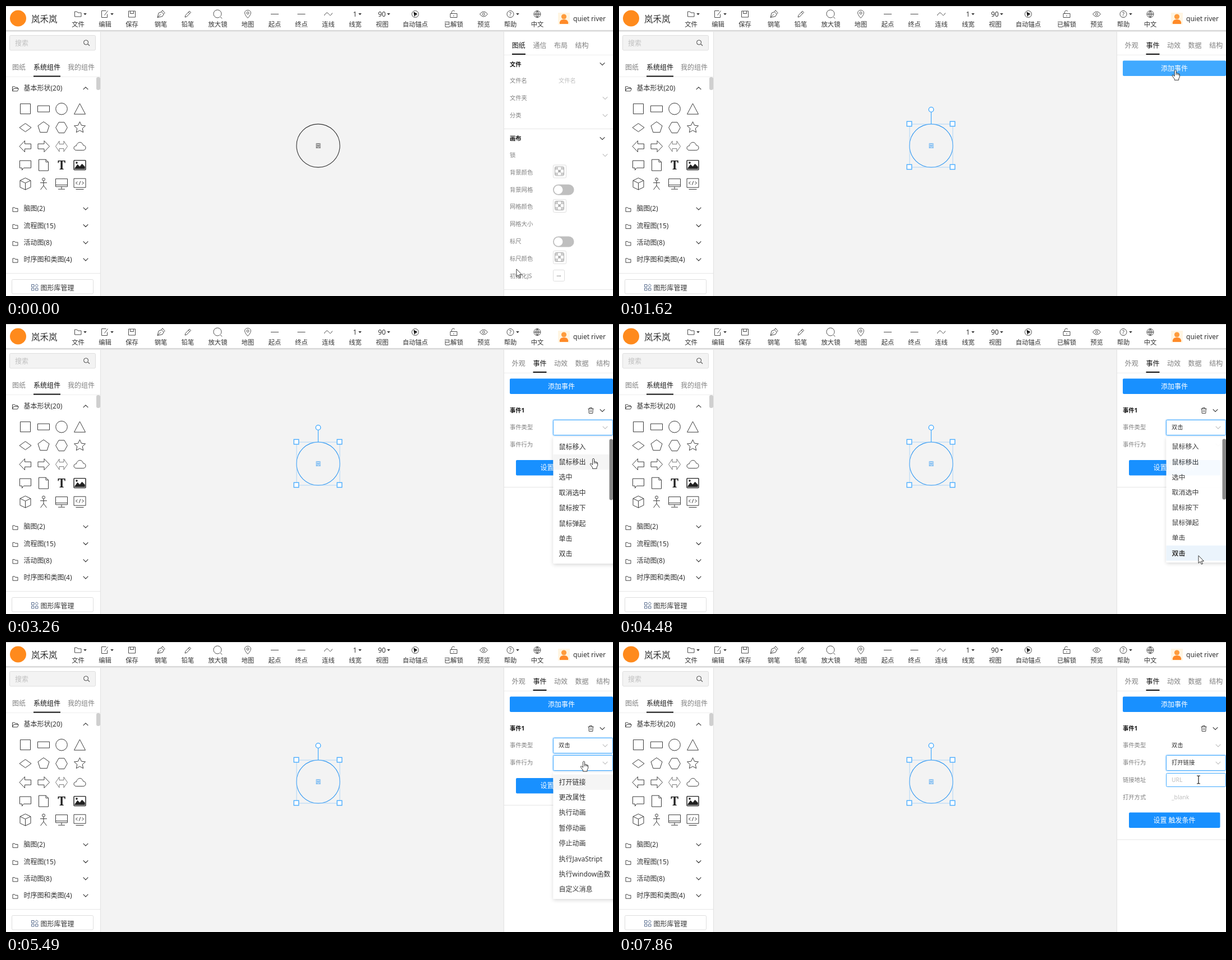
These frames come from a looping animation (1082x518 px, 8 s). An HTML page:

```html
<!DOCTYPE html>
<html lang="zh-CN">
<head>
<meta charset="utf-8">
<title>Diagram editor</title>
<style>
html, body { margin: 0; width: 100%; height: 100%; overflow: hidden; background: #fff; }
svg { display: block; width: 100vw; height: 100vh; }
text { font-family: "Noto Sans", "Noto Sans CJK SC", "Noto Sans CJK", sans-serif; white-space: pre; }
</style>
</head>
<body>
<svg id="stage" viewBox="0 0 1082 518"></svg>
<script>
const DARK = '#333', GREY = '#808080', PALE = '#bfbfbf', BLUE = '#1890ff', LIGHT = '#40a9ff';

// ---- drawing helpers (text y is the visual centre of the line) ----
const text = (s, x, y, size = 12, fill = DARK, anchor = 'start', more = '') =>
  `<text x="${x}" y="${y + size * 0.37}" font-size="${size}" fill="${fill}" text-anchor="${anchor}" ${more}>${s}</text>`;
const mid = (s, x, y, size, fill, more) => text(s, x, y, size, fill, 'middle', more);
const bold = (s, x, y) => text(s, x, y, 10.3, '#111', 'start', 'font-weight="700"');
const label = (s, y) => text(s, 898, y, 10.3, GREY);
const rect = (x, y, w, h, fill, stroke = 'none', r = 0, more = '') =>
  `<rect x="${x}" y="${y}" width="${w}" height="${h}" rx="${r}" fill="${fill}" stroke="${stroke}" ${more}/>`;
const circle = (x, y, r, fill = 'none', stroke = 'none', w = 1) =>
  `<circle cx="${x}" cy="${y}" r="${r}" fill="${fill}" stroke="${stroke}" stroke-width="${w}"/>`;
const icon = (x, y, d, color = '#444', w = 1, fill = 'none') =>
  `<path transform="translate(${x} ${y})" d="${d}" fill="${fill}" stroke="${color}" stroke-width="${w}" stroke-linejoin="round"/>`;
const hline = (x1, x2, y, color = '#e6e6e6') => icon(0, 0, `M${x1} ${y}H${x2}`, color);
const chevron = (x, y, color = DARK, flip = 1) =>
  icon(x, y, `M-4.3 ${-2.2 * flip}L0 ${2.2 * flip}L4.3 ${-2.2 * flip}`, color, 1.1);
const caret = (x, y) => icon(x, y, 'M-2.8-1.5H2.8L0 1.8Z', 'none', 0, DARK);
const group = (id, body) => `<g id="${id}">${body}</g>`;

const ring = r => `M${-r} 0a${r} ${r} 0 1 1 ${2 * r} 0a${r} ${r} 0 1 1 ${-2 * r} 0Z`;
const polygon = (n, r, inner = r, turn = -90) => 'M' + Array.from({ length: n }, (_, i) => {
  const a = (turn + i * 360 / n) * Math.PI / 180, k = i % 2 ? inner : r;
  return (k * Math.cos(a)).toFixed(2) + ' ' + (k * Math.sin(a)).toFixed(2);
}).join('L') + 'Z';
const FOLDER = 'M-6-4.5H-2L-.5-2.5H5.5V4.5H-6Z';

// ---- header ----
function header() {
  const tools = [
    ['文件', 128.5, FOLDER, 141], ['编辑', 176.5, 'M2-6H-6V6H4V0M5-6L-1 2', 189],
    ['保存', 224.5, 'M-6-5.5H6V5.5H-6ZM-3-5.5V-1H3V-5.5'],
    ['钢笔', 276, 'M-6 6L-4-2L1-4L5 0L3 4ZM1-4L3-7L7-2L5 0M-6 6L0 0'],
    ['铅笔', 324, 'M-5 5.5L-4 2L3-5.5L5.5-3L-2 4.5ZM1-3.5L3.5-1'],
    ['放大镜', 377.5, 'M3.5 5.2A7 7 0 1 1 5.2 3.5M4 4L7.5 8'],
    ['地图', 431, 'M0 7C-9-2-5-7 0-7S9-2 0 7ZM-2-2A2 2 0 1 0 2-2A2 2 0 1 0-2-2'],
    ['起点', 479, 'M-7 0H7'], ['终点', 526.5, 'M-7 0H7'],
    ['连线', 574.5, 'M-7 2.5C-4-4-1-3 1 0S5 3 7-2'],
    ['线宽', 622.5, '', 631], ['视图', 670.5, '', 682],
    ['自动锚点', 729.5, ring(6)],
    ['已解锁', 798, 'M-6-1H6V6H-6ZM-3.5-1V-4A3 3 0 0 1 2-5M0 2V4'],
    ['预览', 851.5, 'M-7 0Q0-9 7 0Q0 9-7 0ZM-2 0A2 2 0 1 0 2 0A2 2 0 1 0-2 0'],
    ['帮助', 899, ring(6), 912],
    ['中文', 947, ring(6) + 'M-6 0H6M0-6V6M0-6Q-6 0 0 6M0-6Q6 0 0 6']
  ];
  return rect(0, 43, 1082, 3, '#e2e2e2') + rect(0, 0, 1082, 43.5, '#fff') + hline(0, 1082, .5, '#cfcfcf') +
    hline(0, 1082, 43.5, '#d2d2d2') +
    circle(21.5, 22, 14.5, '#ff8a1c') + text('岚禾岚', 45, 23, 15.5) +
    tools.map(([name, x, d, arrow]) => icon(x, 14.5, d, '#4a4a4a') +
      mid(name, x, 32.5, 11.3) + (arrow ? caret(arrow, 14.5) : '')).join('') +
    mid('1', 622, 14.5, 12) + mid('90', 670, 14.5, 12) + mid('?', 899, 14.5, 9) +
    icon(729.5, 14.5, 'M-2.5-3.5L3.5 0L0 1L-1 4Z', '#111', 1, '#111') +
    rect(984, 12, 21, 21, '#fff5e2') + circle(994.5, 19, 4.6, '#ff9c3c') +
    '<path d="M987 32Q986 24 994.5 24T1002 32Z" fill="#ff8a28"/>' +
    text('quiet river', 1011, 22.5, 12);
}

// ---- left library ----
function library() {
  const shapes = [
    'M-9-9H9V9H-9Z', 'M-10.5-5.5H10.5V5.5H-10.5Z', ring(10.3), 'M0-9.5L10 9.5H-10Z',
    'M-10.5 0L0-7.5L10.5 0L0 7.5Z', polygon(5, 10.5), 'M-5-9.5H5L10.3 0L5 9.5H-5L-10.3 0Z', polygon(10, 10.5, 5),
    'M-10.5 0L-1-10V-4.5H10V4.5H-1V10Z', 'M10.5 0L1-10V-4.5H-10V4.5H1V10Z',
    'M-10.5 0L-4-9.5V-4H4V-9.5L10.5 0L4 9.5V4H-4V9.5Z',
    'M-6 7C-12 7-12-1-6-1C-5-8 4-10 6-2C12-2 12 7 6 7Z',
    'M-10-8H10V5H-3L-6 9V5H-10Z', 'M-8.5-10H4L8.5-5.5V10H-8.5ZM4-10V-5.5H8.5',
    '', 'M-10.5-8.5H10.5V8.5H-10.5Z',
    'M0-10.5L9.5-6V6L0 10.5L-9.5 6V-6ZM-9.5-6L0-1.5L9.5-6M0-1.5V10.5',
    'M-2.5-8A2.5 2.5 0 1 0 2.5-8A2.5 2.5 0 1 0-2.5-8M0-5.5V3M-6-2H6M-5.5 10.5L0 3L5.5 10.5',
    'M-10.5-9H10.5V5H-10.5ZM-10.5 2H10.5M0 5V9M-6 9.5H6',
    'M-10.5-9.5H10.5V6.5H-10.5ZM-7 9.8H7M-4-4L-7-1.5L-4 1M4-4L7-1.5L4 1M1.3-5L-1.3 2'
  ];
  const cats = ['脑图(2)', '流程图(15)', '活动图(8)', '时序图和类图(4)'];
  return rect(0, 46, 168, 472, '#fff') + icon(168.5, 46, 'M0 0V472', '#e2e2e2') +
    rect(6.5, 52.5, 153, 26.5, '#f3f3f3', '#dedede', 2) + text('搜索', 16, 66.5, 12, PALE) +
    icon(143, 65, 'M2.6 2.6A4 4 0 1 1 2.9 2.2M2.6 2.6L6 6', '#555', 1.1) +
    text('图纸', 11, 110, 12, GREY) + text('系统组件', 49, 110, 12, '#111') + text('我的组件', 110, 110, 12, GREY) +
    hline(0, 168, 126.5, '#eeeeee') + rect(49, 124.5, 48, 2, '#111') +
    rect(161, 127, 7, 23, '#cfcfcf', 'none', 3) +
    icon(16.5, 148, 'M-5 4V-4H-1L0-2.5H4V-.5M-5 4L-3-.5H6L4 4Z') + text('基本形状(20)', 31.5, 147) + chevron(142, 147, DARK, -1) +
    shapes.map((d, i) => icon([34.5, 67, 99, 131.5][i % 4], 183.7 + (i >> 2) * 33.5, d, i === 10 ? '#777' : '#3a3a3a')).join('') +
    mid('T', 99, 284, 21, '#222', 'style="font-family:\'Noto Serif\',serif" font-weight="600"') +
    icon(131.5, 284, 'M-9 6L-4-1L0 3L4-2L9 3V7H-9Z', '#222', .5, '#222') + circle(126, 280, 1.8, '#222') +
    rect(121, 275.7, 21, 17, 'none', '#222', 1) +
    cats.map((s, i) => {
      const y = 362 + i * 30.3;
      return icon(16.5, y + 1.5, 'M-4.5-3.5H-1L0-2H4.5V3.8H-4.5Z') + text(s, 31.5, y) + chevron(142, y);
    }).join('') +
    hline(0, 168, 477.5) + rect(10.5, 488.5, 145, 25.5, '#fff', '#dedede', 2) +
    icon(51, 502.5, 'M-5.5-5H-1V-.7H-5.5ZM-5.5 1.5H-1V5.5H-5.5ZM1.5 1.5H6V5.5H1.5ZM3.7-5.8L6.3-3L3.7-.2L1-3Z', '#5b6f90') +
    text('图形库管理', 61.5, 503.5);
}

// ---- right panels ----
const tabs = (names, active) => names.map((s, i) =>
  mid(s, 913.8 + i * 37.6, 70.5, 12, i === active ? '#111' : GREY)).join('') +
  hline(888, 1082, 87.5, '#eeeeee') + rect(902 + active * 37.5, 85, 24, 2, '#111');

function sheetPanel() {
  // checkered tile: grey corners and centre
  const swatch = y => rect(975.5, y - 12, 23, 23, '#fff', '#dedede', 2) +
    rect(978.5, y - 9, 16, 16, '#fff', '#a8a8a8', 2) +
    icon(986.5, y - 1, 'M-7.5-7.5h5v5h-5ZM2.5-7.5h5v5h-5ZM-2.5-2.5h5v5h-5ZM-7.5 2.5h5v5h-5ZM2.5 2.5h5v5h-5Z', 'none', 0, '#cdcdcd') +
    icon(986.5, y - 1, 'M-2-2L2 2M2-2L-2 2', '#8c8c8c');
  const toggle = y => rect(975, y - 9.5, 37.5, 19, '#bfbfbf', 'none', 9.5) + circle(984.6, y, 7.8, '#fff');
  const rows = [['文件名', 133], ['文件夹', 164], ['分类', 195], ['锁', 266], ['背景颜色', 297], ['背景网格', 328],
    ['网格颜色', 358.5], ['网格大小', 389.5], ['标尺', 420.5], ['标尺颜色', 451], ['初始化JS', 482]];
  return tabs(['图纸', '通信', '布局', '结构'], 0) +
    rows.map(r => label(...r)).join('') +
    bold('文件', 898, 104) + bold('画布', 898, 236) + chevron(1063, 103.5) + chevron(1063, 236.5) +
    text('文件名', 985, 133, 10.3, PALE) +
    [164.5, 195.5, 266.5].map(y => chevron(1068, y, PALE)).join('') +
    hline(888, 1082, 219.5) + hline(888, 1082, 506.5) +
    [296, 357.5, 449.5].map(swatch).join('') + toggle(328.3) + toggle(421) +
    rect(975.5, 471.5, 20, 20, '#fff', '#dedede', 2) + mid('...', 985.5, 479.5, 10);
}

const field = (id, y, h = 27) => group(id,
  rect(974.5, y - 1, 108, h + 2, 'none', BLUE, 3, 'class="glow" stroke-width="2" stroke-opacity=".18"') +
  rect(975.5, y, 106, h, '#fff', LIGHT, 2));

function eventPanel() {
  return tabs(['外观', '事件', '动效', '数据', '结构'], 1) +
    rect(898, 97.5, 184, 27.5, BLUE, 'none', 2, 'id="add"') + mid('添加事件', 990, 111.8, 12, '#fff') +
    group('event',
      bold('事件1', 898, 154.5) + chevron(1063, 154.5) +
      icon(1042.5, 154.5, 'M-5-3H5M-2-3V-5H2V-3M-3.8-3L-3.3 5H3.3L3.8-3M-1.2-.5V2.5M1.2-.5V2.5', '#444') +
      label('事件类型', 184.5) + label('事件行为', 215.5) +
      field('typeBox', 171.5) + field('actBox', 202.5) +
      chevron(1068, 185, PALE) + chevron(1068, 216, PALE) +
      group('typeText', text('双击', 985, 184.5, 10.3)) +
      group('link',
        text('打开链接', 985, 215.5, 10.3) + label('链接地址', 246.5) + label('打开方式', 277.5) +
        field('urlBox', 234.5, 24) + text('URL', 985, 246.5, 10.3, PALE) + text('_blank', 985, 277, 10.3, PALE)) +
      group('foot', rect(909, 243, 162.5, 27.5, BLUE, 'none', 2) +
        mid('设置 触发条件', 990, 257, 12, '#fff') + hline(888, 1082, 291.5)));
}

const PITCH = 27.4;
const menu = (id, top, items, bar) => group(id,
  rect(975.5, top, 120, 226, '#fff', 'none', 2, 'filter="url(#shadow)"') +
  rect(975.5, top + 3.6, 110, PITCH, '#f5f5f5', 'none', 0, 'class="row"') +
  items.map((s, i) => text(s, 985.5, top + 17.2 + i * PITCH)).join('') +
  (bar ? rect(1075.5, top + 3.4, 6.5, 109, '#858585', 'none', 3) : ''));

const stage = document.getElementById('stage');
stage.innerHTML = `<defs>
  <filter id="shadow" x="-20%" y="-20%" width="140%" height="140%"><feDropShadow dx="0" dy="2" stdDeviation="3.5" flood-opacity=".16"/></filter></defs>` +
  rect(0, 0, 1082, 518, '#f3f3f3') + library() +
  group('node', circle(556.5, 249.5, 38.6, 'none', 'currentColor', 1.1) + mid('圆', 556.5, 249.3, 9.2, 'currentColor')) +
  group('frame', rect(518, 211, 77, 77, 'none', '#9ccdf8', 0, 'stroke-width=".8"') +
    icon(556.5, 190, 'M0 0V21', LIGHT, 1.2) + circle(556.5, 185, 4.3, '#fff', LIGHT, 1.3) +
    [[517.5, 210.5], [594.5, 210.5], [517.5, 287.5], [594.5, 287.5]]
      .map(([x, y]) => rect(x - 4.3, y - 4.3, 8.6, 8.6, '#fff', LIGHT, 0, 'stroke-width="1.3"')).join('')) +
  rect(888, 46, 194, 472, '#fff') + icon(887.5, 46, 'M0 0V472', '#e2e2e2') +
  group('sheet', sheetPanel()) + group('events', eventPanel()) + header() +
  menu('typeMenu', 202, ['鼠标移入', '鼠标移出', '选中', '取消选中', '鼠标按下', '鼠标弹起', '单击', '双击'], true) +
  menu('actMenu', 233, ['打开链接', '更改属性', '执行动画', '暂停动画', '停止动画', '执行JavaStript', '执行window函数', '自定义消息'], false) +
  group('cursor', `<circle id="press" r="10" fill="#ff0" opacity=".47"/>` +
    group('arrow', icon(0, 0, 'M0 0V13.5L3.2 10.6L5.3 15.4L7.4 14.5L5.3 9.8H9.5Z', '#222', .9, '#fff')) +
    group('hand', icon(0, 0, 'M-1.5 11V1Q0-1.3 1.5 1V6Q3 4.6 4 6.4Q5.5 5.4 6.1 7Q7.6 6.4 7.6 8.5V12.5L6 15.5V18H-1.5V16L-5.5 10.6Q-6 8.8-4.6 8.6ZM1.5 6V9M4 6.4V9M6.1 7V9.5', '#222', .9, '#fff')) +
    group('beam', icon(0, 0, 'M-3-7H-1L0-6L1-7H3M0-6V6M-3 7H-1L0 6L1 7H3', '#222', 1.2)));

// ---- timeline ----
const $ = {};
stage.querySelectorAll('[id]').forEach(el => $[el.id] = el);
const show = (el, on) => el.setAttribute('display', on ? 'inline' : 'none');
const within = (t, a, b) => t >= a && t < b;

// time, x, y of the pointer
const path = [
  [0, 910, 470], [70, 905, 465], [430, 562, 262], [540, 562, 262], [860, 706, 241], [1000, 907, 156],
  [1500, 985, 113], [1770, 1000, 116], [2240, 1059, 188], [2850, 1060, 188], [3260, 1047, 240], [3320, 1047, 257],
  [4010, 1032, 422], [4410, 1032, 422], [4480, 1033, 414], [5190, 1030, 213], [5600, 1030, 213],
  [6050, 1036, 308], [6350, 1045, 390], [6670, 1038, 447], [6740, 1038, 447], [7280, 1032, 245],
  [7610, 1032, 245], [7700, 1033, 246], [8000, 1033, 246]
];
function pointer(t) {
  const i = path.findIndex(p => p[0] > t), a = path[i - 1], b = path[i];
  const k = (t - a[0]) / (b[0] - a[0]);
  return [a[1] + (b[1] - a[1]) * k, a[2] + (b[2] - a[2]) * k];
}

function drawMenu(el, t, top, open, close, y, picked) {
  const p = Math.min(1, Math.max(0, (t - open) / 220)), q = Math.min(1, Math.max(0, (t - close) / 200));
  const vis = (1 - (1 - p) ** 5) * (1 - q ** 3);
  show(el, vis > 0);
  el.setAttribute('opacity', vis);
  el.setAttribute('transform', `translate(0 ${top}) scale(1 ${0.8 + 0.2 * vis}) translate(0 ${-top})`);
  const at = t < close ? Math.min(7, Math.max(0, Math.floor((y - top - 3.6) / PITCH))) : picked;
  const row = el.querySelector('.row');
  row.setAttribute('y', top + 3.6 + at * PITCH);
  row.setAttribute('fill', t < close ? '#f5f5f5' : '#ebf4fc');
  el.querySelectorAll('text')[picked].setAttribute('font-weight', t < close ? 400 : 700);
}

function drawField(el, hover, focus) {
  show(el, hover || focus);
  show(el.querySelector('.glow'), focus);
}

function update(t) {
  const [x, y] = pointer(t), selected = t >= 500;
  $.node.setAttribute('color', selected ? '#2f97f2' : '#333');
  show($.frame, selected);
  show($.sheet, !selected);
  show($.events, selected);
  show($.event, t >= 1770);
  $.add.setAttribute('fill', within(t, 1430, 2560) ? LIGHT : BLUE);

  drawField($.typeBox, within(t, 2180, 2560), within(t, 2560, 5560));
  drawField($.actBox, within(t, 5130, 5280), t >= 5280);
  drawField($.urlBox, t >= 7760, false);
  show($.typeText, t >= 4410);
  show($.link, t >= 7610);
  $.foot.setAttribute('transform', `translate(0 ${t >= 7610 ? 61.5 : 0})`);
  drawMenu($.typeMenu, t, 202, 2560, 4410, y, 7);
  drawMenu($.actMenu, t, 233, 5280, 7610, y, 0);

  const beam = t >= 7760;
  const hand = within(t, 1430, 1840) || within(t, 2180, 4410) || within(t, 5130, 7610);
  show($.beam, beam);
  show($.hand, hand);
  show($.arrow, !beam && !hand);
  show($.press, within(t, 4250, 4410) || within(t, 7430, 7610));
  $.cursor.setAttribute('transform', `translate(${x} ${y})`);
}

const start = performance.now();
function tick(now) {
  update(Math.max(0, now - start) % 8000);
  requestAnimationFrame(tick);
}
update(0);
requestAnimationFrame(tick);
</script>
</body>
</html>
```
